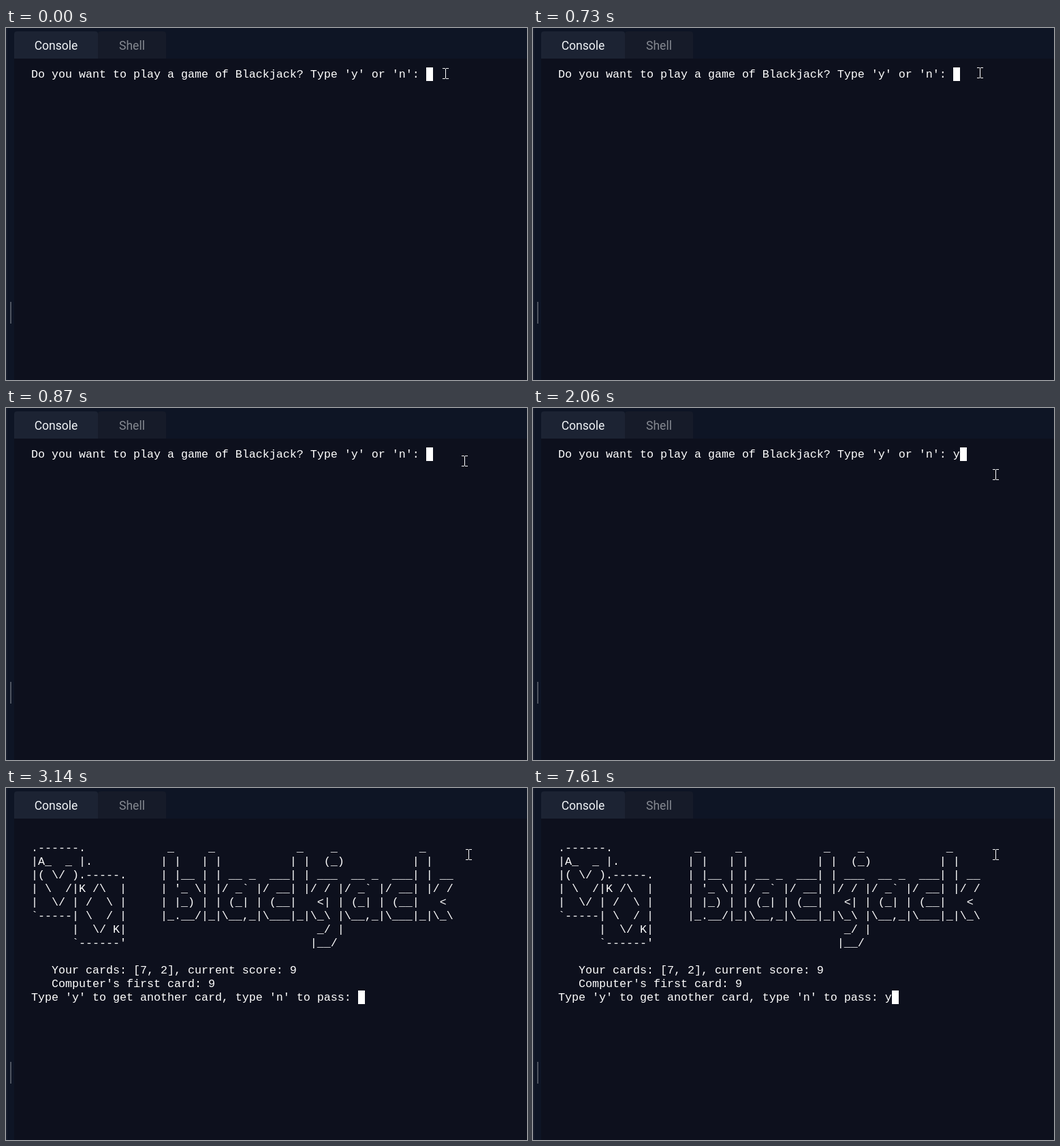
These frames come from a looping animation (765x518 px, 8 s). An HTML page:

```html
<!DOCTYPE html>
<html lang="en">
<head>
<meta charset="utf-8">
<title>Console</title>
<style>
html, body { margin: 0; width: 100%; height: 100%; overflow: hidden; background: #0e1525; }
body > * { position: absolute; box-sizing: border-box; }
.edge { left: 0; top: 0; width: 2px; height: 518px; background: #171d2d; }
.handle { left: 6px; top: 403px; width: 2px; height: 32px; background: #4d535f; }
.tab { top: 5px; height: 40px; border-radius: 4px 4px 0 0; font: 17.5px/42px Roboto, sans-serif; text-align: center; }
.console { left: 12px; width: 123px; background: #1c2333; color: #f0f3f6; }
.shell { left: 135px; width: 100px; background: #161b29; color: #858991; }
.panel { left: 12px; top: 45px; width: 753px; height: 473px; background: #0d101d; }
pre { left: 37px; top: 59px; margin: 0; color: #fff; font: 16.667px/20px "Liberation Mono", monospace; }
#caret { width: 10px; height: 20px; background: #fff; }
#mouse { left: 0; top: 0; width: 10px; height: 16px; }
</style>
</head>
<body>
<div class="edge"></div>
<div class="handle"></div>
<div class="tab console">Console</div>
<div class="tab shell">Shell</div>
<div class="panel"></div>
<pre id="screen"></pre>
<div id="caret"></div>
<svg id="mouse" viewBox="0 0 10 16" shape-rendering="crispEdges">
  <path d="M0 .5h4M5 .5h4M4.5 1v14M0 15.5h4M5 15.5h4" fill="none" stroke="#fff"/>
</svg>
<script>
const byId = id => document.getElementById(id);
const screen = byId('screen'), caret = byId('caret'), mouse = byId('mouse');

const question = "Do you want to play a game of Blackjack? Type 'y' or 'n': ";
// "~" stands for a backtick
const game = String.raw`
.------.            _     _            _    _            _
|A_  _ |.          | |   | |          | |  (_)          | |
|( \/ ).-----.     | |__ | | __ _  ___| | ___  __ _  ___| | __
| \  /|K /\  |     | '_ \| |/ _~ |/ __| |/ / |/ _~ |/ __| |/ /
|  \/ | /  \ |     | |_) | | (_| | (__|   <| | (_| | (__|   <
~-----| \  / |     |_.__/|_|\__,_|\___|_|\_\ |\__,_|\___|_|\_\
      |  \/ K|                            _/ |
      ~------'                           |__/

   Your cards: [7, 2], current score: 9
   Computer's first card: 9
Type 'y' to get another card, type 'n' to pass: `.replaceAll('~', '`');

function textAt(t) {
  if (t < 2060) return question;
  if (t < 3140) return question + 'y';
  return t < 7610 ? game : game + 'y';
}

function mouseAt(t) {
  if (t < 730) return [645, 67];
  const k = Math.min(Math.floor((t - 730) / 70), 4) / 4;
  return [656 + 23 * (1 - (1 - k) ** 2), 66 + 32 * k ** 1.4].map(Math.round);
}

function draw(now) {
  const t = now % 8000, text = textAt(t), [x, y] = mouseAt(t);
  if (screen.textContent !== text) screen.textContent = text;
  const lines = text.split('\n');
  caret.style.left = 37 + 10 * lines.at(-1).length + 'px';
  caret.style.top = 58 + 20 * (lines.length - 1) + 'px';
  mouse.style.transform = `translate(${x - 4}px, ${y - 8}px)`;
  requestAnimationFrame(draw);
}
draw(0);
</script>
</body>
</html>
```
